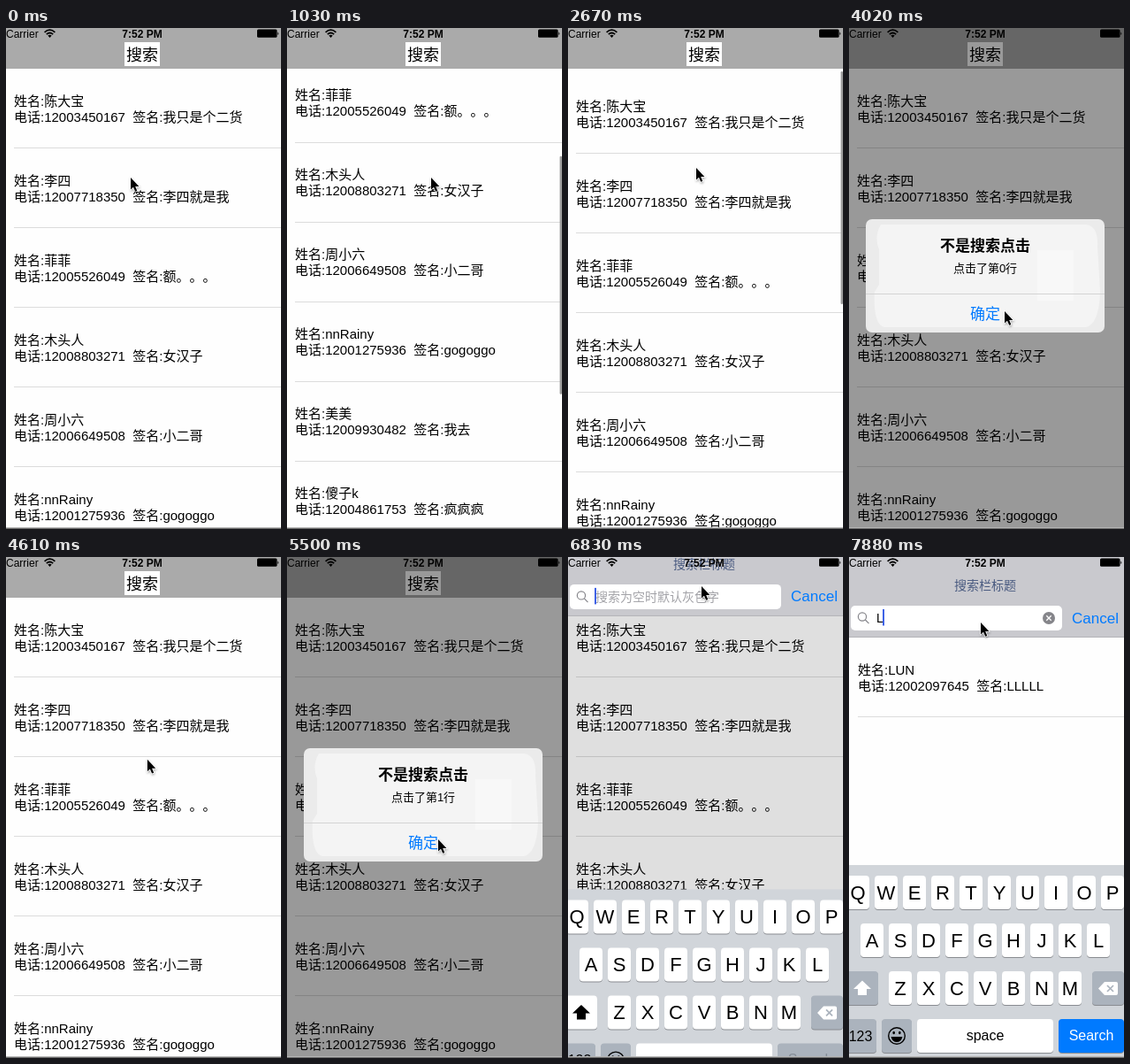
These frames come from a looping animation (311 by 566 pixels, 8 s). An HTML page:

```html
<!DOCTYPE html>
<html lang="zh-CN">
<head>
<meta charset="utf-8">
<title>通讯录搜索</title>
<style>
  html, body { margin: 0; width: 100%; height: 100%; overflow: hidden; background: #fefefe; }
  svg { display: block; width: 311px; height: 566px; }
  text {
    font-family: "Liberation Sans", "Noto Sans CJK SC Light", "Noto Sans CJK SC", "Noto Sans CJK", sans-serif;
    font-weight: 300; white-space: pre;
    text-spacing-trim: space-all; font-feature-settings: "chws" 0, "halt" 0;
  }
  .mid { text-anchor: middle; }
  .bold { font-weight: bold; font-family: "Liberation Sans", "Noto Sans CJK SC", "Noto Sans CJK", sans-serif; }
</style>
</head>
<body>
<svg viewBox="0 0 311 566">
  <defs>
    <clipPath id="listClip"><rect y="46" width="311" height="520"/></clipPath>
    <filter id="soft" x="-50%" y="-50%" width="220%" height="220%">
      <feDropShadow dx="0.5" dy="1.5" stdDeviation="1" flood-opacity=".35"/>
    </filter>
  </defs>
  <rect width="311" height="566" fill="#fefefe"/>

  <g clip-path="url(#listClip)" font-size="15">
    <g id="list"></g>
    <rect id="thumb" x="308.5" width="2.5" rx="1.2" fill="#999"/>
  </g>

  <rect width="311" height="46" fill="#aaa"/>
  <rect x="134" y="16" width="40" height="27" fill="#fff"/>
  <text class="mid" x="154" y="36.5" font-size="18">搜索</text>

  <rect id="searchDim" y="46" width="311" height="520"/>
  <g id="results" font-size="15"><rect y="91" width="311" height="475" fill="#fefefe"/></g>

  <g id="bar">
    <rect width="311" height="91" fill="#c9c9ce"/>
    <rect y="90" width="311" height="1" fill="#b3b3b8"/>
    <text class="mid" x="154" y="37" font-size="14" fill="#4a5b80">搜索栏标题</text>
    <rect x="2" y="55" width="239" height="28" rx="5" fill="#fff"/>
    <g fill="none" stroke="#85858a" stroke-width="1.2">
      <circle cx="15" cy="67.5" r="4.6"/><path d="M18.4 71 L22.5 75.2"/>
    </g>
    <text id="hint" x="31" y="74" font-size="14" fill="#a3a3a8">搜索为空时默认灰色字</text>
    <g id="query">
      <text x="31" y="74" font-size="14">L</text>
      <circle cx="226" cy="69" r="7" fill="#85858a"/>
      <path d="M223.3 66.3 l5.4 5.4 m0 -5.4 l-5.4 5.4" stroke="#fff" stroke-width="1.3"/>
    </g>
    <rect id="caret" y="59" width="2" height="18.5" fill="#3f62e6"/>
    <text x="252" y="74.5" font-size="17" fill="#007aff">Cancel</text>
  </g>

  <g font-size="12">
    <text x="0" y="10.5">Carrier</text>
    <g fill="none" stroke="#000" stroke-width="1.7">
      <path d="M43.6 4.8 Q49.5 -.6 55.4 4.8"/><path d="M45.8 7.2 Q49.5 3.8 53.2 7.2"/>
    </g>
    <path d="M47.3 8.6 Q49.5 6.7 51.7 8.6 L49.5 11 Z"/>
    <text class="mid bold" x="154" y="10.5">7:52 PM</text>
    <rect x="284" y="1.6" width="22.5" height="9.2" rx="1.5"/>
    <path d="M307.3 4.4 Q309.3 6.2 307.3 8 Z"/>
  </g>

  <g id="keyboard"><rect y="348" width="311" height="218" fill="#d1d5da"/></g>

  <rect id="alertDim" width="311" height="566"/>
  <g id="alert">
    <rect x="19" y="216" width="270" height="128" rx="7" fill="#ebebeb"/>
    <path d="M36 222 H268 Q282 224 281 246 L284 298 Q283 334 268 338 H40 Q27 335 29 298 L34 290 V250 Q28 236 36 222 Z" fill="#f4f4f4"/>
    <rect x="213" y="251" width="41" height="57" fill="#f8f8f8"/>
    <rect x="19" y="300" width="270" height="1" fill="#d3d3d3"/>
    <text class="mid bold" x="154" y="252" font-size="17">不是搜索点击</text>
    <text id="message" class="mid" x="154" y="276" font-size="13"></text>
    <text class="mid" x="154" y="328.5" font-size="17" fill="#007aff">确定</text>
  </g>

  <rect y="564" width="311" height="1" fill="#b5b5b5"/>
  <rect y="565" width="311" height="1" fill="#6c6c6c"/>
  <path id="pointer" d="M0 0 V13.4 L3 10.7 L5.2 15.8 L7.3 14.9 L5.2 9.9 H9.4 Z"
        stroke="#fff" stroke-width="1.2" paint-order="stroke" filter="url(#soft)"/>
</svg>
<script>
const LOOP = 8000, ROW = 90, MAX_SCROLL = 470;
const $ = id => document.getElementById(id);

function add(parent, tag, attrs, text) {
  const el = document.createElementNS('http://www.w3.org/2000/svg', tag);
  for (const k in attrs) el.setAttribute(k, attrs[k]);
  if (text) el.textContent = text;
  parent.append(el);
  return el;
}

const people = [
  ['陈大宝', '12003450167', '我只是个二货'],
  ['李四', '12007718350', '李四就是我'],
  ['菲菲', '12005526049', '额。。。'],
  ['木头人', '12008803271', '女汉子'],
  ['周小六', '12006649508', '小二哥'],
  ['nnRainy', '12001275936', 'gogoggo'],
  ['美美', '12009930482', '我去'],
  ['傻子k', '12004861753', '疯疯疯'],
  ['LUN', '12002097645', 'LLLLL'],
  ['女', '12003384210', '女L'],
  ['男', '12006152879', '男男']
];

function addRow(parent, [name, phone, sign], x, y) {
  add(parent, 'text', { x, y: y + 41.5 }, '姓名:' + name);
  add(parent, 'text', { x, y: y + 59.5 }, `电话:${phone}  签名:${sign}`);
  add(parent, 'rect', { x, y: y + 89, width: 311 - x, height: 1, fill: '#dcdcdc' });
}
people.forEach((p, i) => addRow($('list'), p, 9, 46 + i * ROW));
addRow($('results'), people[8], 10, 91);

// Keyboard
const board = $('keyboard'), GREY = '#abb3bd';
function addKey(x, y, width, fill = '#fff') {
  add(board, 'rect', { x, y: y + 1, width, height: 38, rx: 4, fill: '#898c91' });
  return add(board, 'rect', { x, y, width, height: 38, rx: 4, fill });
}
function label(x, y, size, text) {
  return add(board, 'text', { class: 'mid', x, y, 'font-size': size }, text);
}
[['QWERTYUIOP', -3], ['ASDFGHJKL', 13], ['ZXCVBNM', 45]].forEach(([letters, left], row) => {
  [...letters].forEach((c, i) => {
    const x = left + 32 * i, y = 360 + 54 * row;
    addKey(x, y, 26);
    label(x + 13, y + 27, 22, c);
  });
});
const shiftKey = addKey(-3, 468, 36);
const shiftArrow = add(board, 'path', { d: 'M15 478.5 L25 488 H20 V495 H10 V488 H5 Z' });
addKey(275, 468, 36, GREY);
add(board, 'path', { d: 'M282 487.5 L289 480 H302 Q304 480 304 482 V493 Q304 495 302 495 H289 Z', fill: '#fff' });
add(board, 'path', { d: 'M292 484 l7 7 m0 -7 l-7 7', stroke: GREY, 'stroke-width': 1.7 });
addKey(-3, 522, 34, GREY);
label(13, 546.5, 16, '123');
addKey(37, 522, 34, GREY);
add(board, 'circle', { cx: 54, cy: 541, r: 9.3, fill: 'none', stroke: '#000', 'stroke-width': 1.4 });
for (const cx of [50.7, 57.3]) add(board, 'ellipse', { cx, cy: 537.5, rx: 1.3, ry: 1.8 });
add(board, 'path', { d: 'M47.5 542 H60.5 Q59 548 54 548 Q49 548 47.5 542 Z' });
addKey(77, 522, 154);
label(154, 546, 16, 'space');
const goKey = addKey(237, 522, 74);
const goLabel = label(274, 546, 16, 'Search');

// Motion
const linear = (t, a, b) => Math.min(1, Math.max(0, (t - a) / (b - a)));
const ramp = (t, a, b) => { const p = linear(t, a, b); return p * p * (3 - 2 * p); };
const set = (el, attrs) => { for (const k in attrs) el.setAttribute(k, attrs[k]); };
const show = (el, on) => set(el, { visibility: on ? 'visible' : 'hidden' });

// The screen refreshes at a fixed beat after a short rest.
const REST = 282, BEAT = 148.6;
const snap = t => t < REST ? 0 : REST + BEAT * Math.floor((t - REST) / BEAT);

// Flick to just past the end, bounce back, then the same towards the top.
const scrollAt = t => 479 * ramp(t, 600, 1600) - 9 * ramp(t, 1620, 1760)
  - 476 * ramp(t, 1760, 2650) + 6 * ramp(t, 2660, 2800);

// Pointer stops: arrival time, x, y
const TRAVEL = 300;
const stops = [[0, 141, 169], [450, 166, 252], [890, 163, 169], [2070, 156, 225], [2500, 145, 158],
  [3120, 150, 105], [3990, 176, 320], [4700, 153, 190], [5480, 171, 319], [6290, 151, 33], [7430, 149, 74]];
const pointerAt = t => stops.reduce(([x, y], [arrive, nx, ny]) => {
  const p = ramp(t, arrive - TRAVEL, arrive);
  return [x + (nx - x) * p, y + (ny - y) * p];
}, [0, 0]);

function drawList(t) {
  const off = scrollAt(t);
  const over = Math.max(0, -off, off - MAX_SCROLL);
  const pos = linear(off, 0, MAX_SCROLL);
  set($('list'), { transform: `translate(0 ${-off})` });
  set($('thumb'), {
    y: 49 + 242 * pos + (off > 0 ? over : 0),
    height: 269 - over,
    opacity: ramp(t, 600, 740) - ramp(t, 2820, 3120)
  });
}

function drawAlert(t) {
  const row = t < 4600 ? 0 : 1;
  const age = t - [3270, 4750][row];
  const open = ramp(age, 0, 300), fade = open - ramp(age, 900, 1200);
  set($('alertDim'), { opacity: .4 * fade });
  set($('alert'), {
    opacity: fade,
    transform: `translate(154 280) scale(${1.2 - .2 * open}) translate(-154 -280)`
  });
  $('message').textContent = `点击了第${row}行`;
}

function drawSearch(t) {
  const p = linear(t, 6530, 6925), rise = 1 - (1 - p) ** 1.56;
  const typed = t >= 7700;
  set($('bar'), { transform: `translate(0 ${-91 * (1 - p)})` });
  set(board, { transform: `translate(0 ${218 * (1 - rise)})` });
  set($('searchDim'), { opacity: .165 * p });
  show($('results'), typed);
  show($('query'), typed);
  show($('hint'), !typed);
  set($('caret'), { x: typed ? 38 : 30 });
  set(shiftKey, { fill: typed ? GREY : '#fff' });
  set(shiftArrow, { fill: typed ? '#fff' : '#000' });
  set(goKey, { fill: typed ? '#007aff' : GREY });
  set(goLabel, { fill: typed ? '#fff' : '#858d97' });
}

const start = performance.now();
function loop() {
  const t = snap((performance.now() - start) % LOOP);
  drawList(t);
  drawAlert(t);
  drawSearch(t);
  set($('pointer'), { transform: `translate(${pointerAt(t)})` });
  requestAnimationFrame(loop);
}
loop();
</script>
</body>
</html>
```
